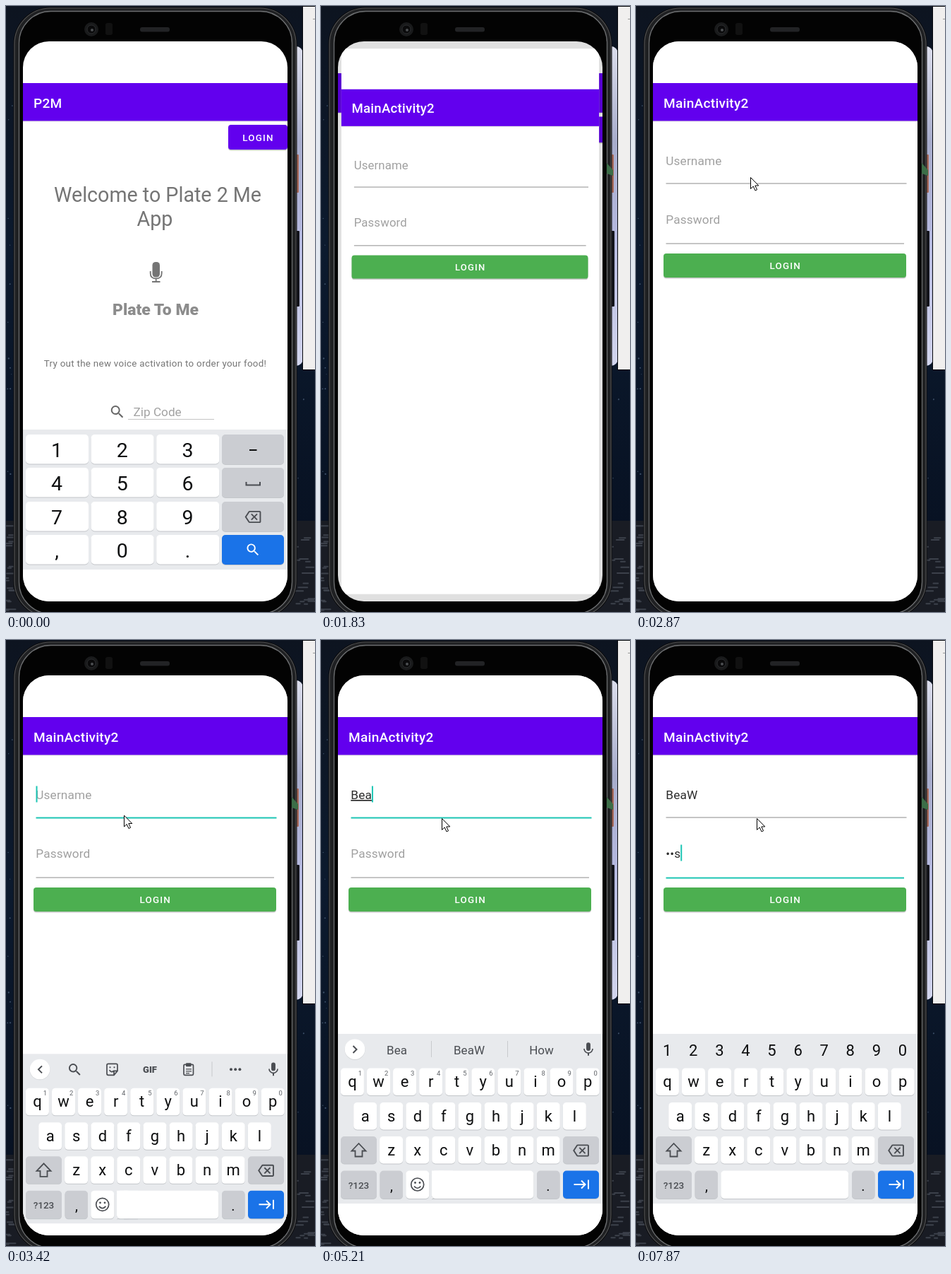
Animation of 438x857 px, one loop 8 s. Source, as an HTML page:

```html
<!DOCTYPE html>
<html lang="en">
<head>
<meta charset="utf-8">
<title>Phone login</title>
<style>
  html, body { margin: 0; width: 100%; height: 100%; overflow: hidden; background: #0b1423; }
  svg { display: block; width: 438px; height: 857px; }
  text { font-family: Roboto, sans-serif; white-space: pre; }
</style>
</head>
<body>
<svg id="stage" viewBox="0 0 438 857" xmlns="http://www.w3.org/2000/svg"></svg>
<script>
const LOOP = 8000;
const PURPLE = '#6200ee', TEAL = '#1cc5b4', INK = '#0e0f10', ICON = '#4a4d52';
const stage = document.getElementById('stage');

// ---- markup helpers ----
const rect = (x, y, w, h, fill, rx = 0, extra = '') =>
  `<rect x="${x}" y="${y}" width="${w}" height="${h}" rx="${rx}" fill="${fill}" ${extra}/>`;
const circle = (x, y, r, fill, extra = '') => `<circle cx="${x}" cy="${y}" r="${r}" fill="${fill}" ${extra}/>`;
const text = (x, y, s, size, fill, extra = '') =>
  `<text x="${x}" y="${y}" font-size="${size}" fill="${fill}" ${extra}>${s}</text>`;
const MID = 'text-anchor="middle"';
const mid = (x, y, s, size, fill, extra = '') => text(x, y, s, size, fill, `${MID} ${extra}`);
const line = (d, color, width = 2, extra = '') =>
  `<path d="${d}" fill="none" stroke="${color}" stroke-width="${width}" ${extra}/>`;
const group = (id, body, extra = '') => `<g id="${id}" ${extra}>${body}</g>`;
const icon = (x, y, scale, d, fill) =>
  `<path transform="translate(${x} ${y}) scale(${scale}) translate(-12 -12)" d="${d}" fill="${fill}"/>`;
const key = (x, y, w, h, fill = '#fff') =>
  rect(x, y + 1, w, h, '#c3c6ca', 5) + rect(x, y, w, h, fill, 5);
const range = n => [...Array(n).keys()];

const SEARCH = 'M15.5 14h-.79l-.28-.27A6.47 6.47 0 0 0 16 9.5 6.5 6.5 0 1 0 9.5 16c1.61 0 3.09-.59 4.23-1.57l.27.28v.79l5 4.99L20.49 19l-4.99-5zm-6 0C7.01 14 5 11.99 5 9.5S7.01 5 9.5 5 14 7.01 14 9.5 11.99 14 9.5 14z';
const DELETE = 'M22 3H7c-.69 0-1.23.35-1.59.88L0 12l5.41 8.11c.36.53.9.89 1.59.89h15c1.1 0 2-.9 2-2V5c0-1.1-.9-2-2-2zm0 16H7.07L2.4 12l4.66-7H22v14zm-11.59-2L14 13.41 17.59 17 19 15.59 15.41 12 19 8.41 17.59 7 14 10.59 10.41 7 9 8.41 12.59 12 9 15.59z';
const MIC = 'M12 14a3 3 0 0 0 3-3V5a3 3 0 0 0-6 0v6a3 3 0 0 0 3 3zm5.3-3a5.3 5.3 0 0 1-10.6 0H5a7 7 0 0 0 6 6.9V21h2v-3.1a7 7 0 0 0 6-6.9z';

// ---- scenery and phone ----
function backdrop() {
  let seed = 7;
  const rnd = () => (seed = seed * 16807 % 2147483647) / 2147483647;
  const stars = range(26).map(i =>
    circle(i % 2 ? rnd() * 11 : 414 + rnd() * 24, 60 + rnd() * 660, .5 + rnd() * .7, '#3d5068')).join('');
  const waves = range(36).map(i =>
    rect(i % 2 ? rnd() * 8 - 4 : 408 + rnd() * 22, 734 + rnd() * 120, 6 + rnd() * 10, 2, '#3c414b', 1)).join('');
  return rect(0, 0, 438, 857, 'url(#sky)') + rect(0, 728, 438, 129, '#191c24') + stars + waves +
    rect(400, 57, 21, 452, 'url(#moon)', 10) +
    rect(420, 0, 18, 515, '#05070b') + rect(421, 1, 17, 513, '#f0efee') + rect(435, 18, 3, 1, '#999');
}

function phone() {
  return rect(409, 210, 6, 54, '#a86b5b', 1) + rect(409, 318, 7, 107, '#14151c', 1) +
    rect(10.5, 1.5, 402, 864, '#0b0b0c', 52) +
    rect(12, 3, 399, 861, '#1f2022', 51, 'stroke="#505153" stroke-width="1.2"') +
    rect(18.5, 7.5, 387, 852, '#030303', 45, 'stroke="#6c6e70" stroke-width="1.3"') +
    circle(121, 33, 10, '#191a1b') + circle(121, 33, 6, '#0a0a0b', 'stroke="#2c2d2f"') + circle(122, 34, 2, '#4c4f52') +
    rect(141, 24, 10, 17, '#111', 3) + rect(190, 30, 42, 6.5, '#222325', 3);
}

// ---- app screens ----
const header = title => rect(24, 50, 375, 792, '#fff') + rect(24, 162, 375, 1.5, '#ddd') +
  rect(24, 109, 375, 53.5, PURPLE) +
  text(39, 143.5, title, 19.1, '#fff', 'font-weight="500" letter-spacing=".25"');
const button = (x, y, w, h, fill) => rect(x, y + 1.5, w, h, '#000', 4, 'opacity=".22"') + rect(x, y, w, h, fill, 4);
const buttonLabel = (x, y) => mid(x, y, 'LOGIN', 13.4, '#fff', 'font-weight="500" letter-spacing="1.2"');

const home = () => header('P2M') +
  button(315, 168, 84, 35, PURPLE) +
  '<g clip-path="url(#loginClip)"><circle id="ripple" cx="374" cy="185" fill="#fff"/></g>' +
  buttonLabel(357.5, 191) +
  mid(215, 277, 'Welcome to Plate 2 Me', 28.65, '#757575') +
  mid(211, 310.5, 'App', 28.65, '#757575') +
  rect(207.5, 362, 10.5, 21.5, '#757575', 4.5) +
  line('M204.7 375v3q0 7.500 8 7.500t8-7.500v-3M212.7 385v5M207 390h11.500', '#757575', 1.8) +
  mid(212, 437, 'Plate To Me', 22.9, '#8c8c8c', 'font-weight="900"') +
  mid(211.5, 510, 'Try out the new voice activation to order your food!', 13.37, '#757575', 'letter-spacing=".3"') +
  icon(157.7, 574, 1, SEARCH, '#666') +
  text(180.5, 580, 'Zip Code', 17.2, '#a2a2a2') +
  rect(173, 584, 122, 1, '#c4c4c4') + rect(181, 564, 1.8, 21, TEAL, 0, 'id="zipCaret"');

const field = (id, y, w, lineY) =>
  `<text id="${id}Text" x="42.300" y="${y}" font-size="17.2" letter-spacing=".15"></text>` +
  rect(42.5, lineY, w, 1, '#8c8c8c', 0, `id="${id}Line"`) +
  rect(0, y - 18.5, 2, 23, TEAL, 0, `id="${id}Caret"`);

const login = () => header('MainActivity2') +
  field('user', 225, 341, 250.5) + field('pass', 308, 337.5, 335.5) +
  button(39, 350, 344, 34, '#4caf50') + buttonLabel(211.7, 372.3);

// ---- keyboards ----
function numberPad() {
  const rows = ['123', '456', '789', ',0.'];
  const keys = rows.map((row, r) => {
    const y = Math.round(605.5 + r * 47.5);
    return [...row].map((c, i) => key(28 + i * 92.6, y, 89, 41.5) +
      mid(72 + i * 92.8, y + 32, c, 28.5, INK)).join('') +
      key(306, y, 88, 42, r === 3 ? '#1a73e8' : '#cbcdd2');
  }).join('');
  return rect(24, 599, 375, 198, '#e8eaed') + rect(24, 797, 375, 45, '#fff') + keys +
    rect(345, 627, 10.5, 2, INK) + line('M340.500 673v4.500h19.500v-4.500', ICON) +
    icon(350, 722.5, .95, DELETE, ICON) + icon(350, 769, .95, SEARCH, '#fff');
}

const PITCH = 37.08;
const letters = (row, x0, y) => [...row].map((c, i) =>
  key(x0 + i * PITCH - 16.5, y, 33, 38.5) + mid(x0 + i * PITCH, y + 26.5, c, 22, INK)).join('');
const digits = (y, size, dx, fill) =>
  [...'1234567890'].map((d, i) => mid(44.2 + dx + i * PITCH, y, d, size, fill)).join('');

function toolbar() {
  return line('M51 574l-5 5 5 5', ICON) + icon(97.5, 579.3, .95, SEARCH, ICON) +
    line('M153 587h-8q-2 0-2-2v-12q0-2 2-2h11q2 0 2 2v8zM153 587v-6h5M146.500 580q3 4 6 1', ICON, 1.7) +
    circle(147.5, 576, 1.1, ICON) + circle(153.5, 576, 1.1, ICON) +
    mid(204, 583.3, 'GIF', 13, ICON, 'font-weight="900"') +
    rect(252, 572, 13.5, 15, 'none', 1.5, `stroke="${ICON}" stroke-width="1.7"`) +
    rect(255, 570, 7.5, 5, ICON, 1) + line('M255 578.500h8M255 581.500h8M255 584.300h5', ICON, 1.3) +
    rect(291.5, 568, 1, 21, '#c8cacd') +
    [319, 325.2, 331.4].map(x => circle(x, 579, 2, ICON)).join('');
}

function suggestions() {
  return line('M45.500 574l5 5-5 5', ICON) +
    [156, 264].map(x => rect(x, 567, 1, 23, '#c8cacd')).join('') +
    [107.5, 210, 312.5].map((x, i) => mid(x, 585.5, '', 17, ICON, `id="hint${i}"`)).join('');
}

function qwerty() {
  const gray = '#cbcdd2';
  return rect(24, 557, 375, 240, '#e8eaed') + rect(24, 797, 375, 45, '#fff') +
    group('strip', circle(48, 579.5, 14.5, '#d5d7da') + circle(48, 578.7, 14.3, '#fff') + icon(379, 579, .98, MIC, ICON) +
      group('toolbar', toolbar()) + group('suggest', suggestions())) +
    group('digitRow', digits(587.5, 22, 0, INK)) +
    letters('qwertyuiop', 44.4, 605.5) + group('digitMarks', digits(616, 9.5, 11.3, '#5f6368')) +
    letters('asdfghjkl', 62.7, 654) + letters('zxcvbnm', 99.6, 702) +
    key(28, 702, 51, 38.5, gray) + key(343, 702, 51, 38.5, gray) +
    line('M53.500 712l-10 10.500h5v8h10v-8h5z', ICON, 1.8, 'id="shift"') + icon(368.5, 722, .95, DELETE, ICON) +
    key(28, 750.5, 51, 39.5, gray) + mid(53.5, 775.5, '?123', 13.5, ICON, 'font-weight="500"') +
    key(83.5, 750.5, 32.5, 39.5, gray) + mid(100, 779, ',', 20, INK) +
    key(120.3, 750.5, 181, 39.5) +
    group('emojiKey', rect(120, 750, 37, 41.5, '#e8eaed') + key(120.3, 750.5, 33, 39.5) + key(157, 750.5, 20, 39.5) +
      rect(167, 750.5, 20, 39.5, '#fff') + rect(167, 790, 20, 1, '#c3c6ca') +
      circle(136.7, 770, 9, 'none', `stroke="${ICON}" stroke-width="1.700"`) +
      circle(133.5, 767.5, 1.4, ICON) + circle(140, 767.5, 1.4, ICON) + line('M132 772.500q4.700 5.500 9.400 0', ICON, 1.7)) +
    key(306, 750.5, 32.5, 39.5, gray) + mid(322, 779, '.', 20, INK) +
    key(343, 750.5, 51, 39.5, '#1a73e8') + line('M358.500 770h15M369 764.500l5.500 5.500-5.500 5.500M379 763.500v13', '#fff');
}

stage.innerHTML = `<defs>
  <linearGradient id="sky" x1="0" y1="0" x2="0" y2="1"><stop offset="0" stop-color="#0d1420"/>
    <stop offset=".4" stop-color="#0c1a2e"/><stop offset=".85" stop-color="#081223"/></linearGradient>
  <linearGradient id="moon" x1="0" y1="0" x2="0" y2="1"><stop offset="0" stop-color="#dcdeec"/>
    <stop offset=".3" stop-color="#a8adcc"/><stop offset=".6" stop-color="#b6bae0"/><stop offset="1" stop-color="#d3d6ee"/></linearGradient>
  <clipPath id="screenClip"><rect x="24" y="50" width="375" height="792" rx="37"/></clipPath>
  <clipPath id="loginClip"><rect x="315" y="168" width="84" height="35" rx="4"/></clipPath></defs>` +
  backdrop() + phone() +
  group('screen', group('home', home()) + group('numberPad', numberPad()) +
    rect(24, 50, 375, 792, '#000', 0, 'id="dim"') + group('login', login()) + group('qwerty', qwerty()),
    'clip-path="url(#screenClip)"') +
  '<path id="smudge" d="M405 222l9 10v8l-9-3z" fill="#3c6e48"/>' +
  circle(0, 0, 12, '#e0c020', 'id="press" opacity=".7"') +
  '<path id="cursor" d="M.500.500V16.500l3.700-3.500 2.800 6 2.600-1.200-2.800-5.800h5z" fill="#fff" stroke="#000" stroke-width="1"/>';

// ---- motion ----
const el = {};
stage.querySelectorAll('[id]').forEach(n => el[n.id] = n);
const set = (id, attrs) => { for (const k in attrs) el[id].setAttribute(k, attrs[k]); };
const show = (id, on) => set(id, { visibility: on ? 'inherit' : 'hidden' });
const clamp = x => Math.max(0, Math.min(1, x));
const part = (t, a, b) => clamp((t - a) / (b - a));
const lerp = (a, b, k) => a + (b - a) * k;
const easeInOut = k => k * k * (3 - 2 * k);
const easeOut = k => 1 - (1 - k) ** 3;
const bezier = (a, b, c, d, u) => {
  const v = 1 - u;
  return a * v * v * v + 3 * b * v * v * u + 3 * c * v * u * u + d * u * u * u;
};

// Two joined curves: a quick rise and a very long settling tail.
function extraSlowIn(k) {
  const [xs, ys] = k < 1 / 6 ? [[0, .05, .1333, 1 / 6], [0, 0, .06, .4]] : [[1 / 6, .2083, .25, 1], [.4, .82, 1, 1]];
  let lo = 0, hi = 1;
  for (let i = 0; i < 24; i++) {
    const u = (lo + hi) / 2;
    if (bezier(...xs, u) < k) lo = u; else hi = u;
  }
  return bezier(...ys, lo);
}
const zoom = s => ({ transform: `translate(211.5 446) scale(${s}) translate(-211.5 -446)` });
const latest = (list, t) => list.filter(e => e[0] <= t).pop();

// start, end, from x, y, to x, y; each move rests until the next, null hides the pointer
const MOVES = [
  [0, null], [450, 940, 421, 236, 373, 182], [1480, 1690, 373, 182, 405, 222], [1760, null],
  [2180, 2810, 408, 82, 162, 242], [3220, 3500, 162, 242, 171, 252]
];
const USER = [[0, '', 0], [4410, 'B', 0], [4610, 'B', 1], [4880, 'Be', 1], [5010, 'Bea', 2],
  [5210, 'Bea', 3], [5810, 'BeaW', 3], [6010, 'BeaW', 4], [6540, 'BeaW', 0]];
const PASS = [[0, ''], [7330, 'p'], [7600, '•a'], [7870, '••s']];
const HINTS = [[0, '', '', ''], [4610, 'B', 'But', 'By'], [5010, 'Be', 'Been', 'Bed'],
  [5210, 'Bea', 'BeaW', 'How'], [6010, 'BeaW', 'Bea', 'Beach']];

function drawField(id, value, underlined, label, focused, caretOn, lineY) {
  const node = el[id + 'Text'];
  node.innerHTML = value
    ? `<tspan text-decoration="underline">${value.slice(0, underlined)}</tspan>${value.slice(underlined)}` : label;
  node.setAttribute('fill', value ? '#2b2b2b' : '#a0a0a0');
  set(id + 'Caret', { x: value ? 42.3 + node.getComputedTextLength() : 42.5 });
  show(id + 'Caret', caretOn);
  set(id + 'Line', focused ? { fill: TEAL, height: 2, y: lineY } : { fill: '#8c8c8c', height: 1, y: lineY });
}

function render(t) {
  const m = t - (t - 10) % 70;

  show('zipCaret', t >= 380 && t < 880);
  set('ripple', { r: m < 1270 ? 0 : 15 + (m - 1270) * .25, opacity: .2 * (1 - part(m, 1480, 1690)) });
  set('numberPad', { transform: `translate(0 ${243 * easeInOut(part(m, 1480, 1720))})` });

  const open = extraSlowIn(part(m, 1715, 2115));
  set('home', zoom(lerp(1, 1.05, open)));
  set('login', { ...zoom(lerp(.85, 1, open)), opacity: part(m, 1750, 1800) });
  set('dim', { opacity: .12 * part(m, 1715, 1800) });

  const [, name, underlined] = latest(USER, t);
  const onPass = t >= 6540;
  const userCaret = (t >= 3150 && t < 3680) || (t >= 4210 && !onPass);
  drawField('user', name, underlined, 'Username', t >= 3000 && !onPass, userCaret, 250.5);
  drawField('pass', latest(PASS, t)[1], 0, 'Password', onPass, onPass && (t < 7000 || t >= 7330), 335.5);

  show('qwerty', t >= 3150);
  set('qwerty', { transform: `translate(0 ${285 * (1 - easeOut(part(m, 3150, 3560)))})` });
  const suggesting = t >= 4610;
  show('strip', !onPass);
  show('toolbar', !suggesting);
  show('suggest', suggesting);
  latest(HINTS, t).slice(1).forEach((word, i) => el['hint' + i].textContent = word);
  show('digitRow', onPass);
  show('digitMarks', !onPass);
  show('emojiKey', !onPass);
  set('shift', { fill: t >= 5740 && t < 5810 ? ICON : 'none' });

  const move = latest(MOVES, t);
  const visible = move[1] !== null;
  show('cursor', visible);
  show('press', visible && ((t >= 1270 && t < 1410) || (t >= 3000 && t < 3150)));
  show('smudge', t >= 1760);
  if (visible) {
    const [a, b, x0, y0, x1, y1] = move;
    const k = easeInOut(part(m, a, b));
    const x = lerp(x0, x1, k), y = lerp(y0, y1, k);
    set('cursor', { transform: `translate(${x} ${y})` });
    set('press', { cx: x, cy: y });
  }
}

const start = performance.now();
function frame() {
  render((performance.now() - start) % LOOP);
  requestAnimationFrame(frame);
}
frame();
</script>
</body>
</html>
```
